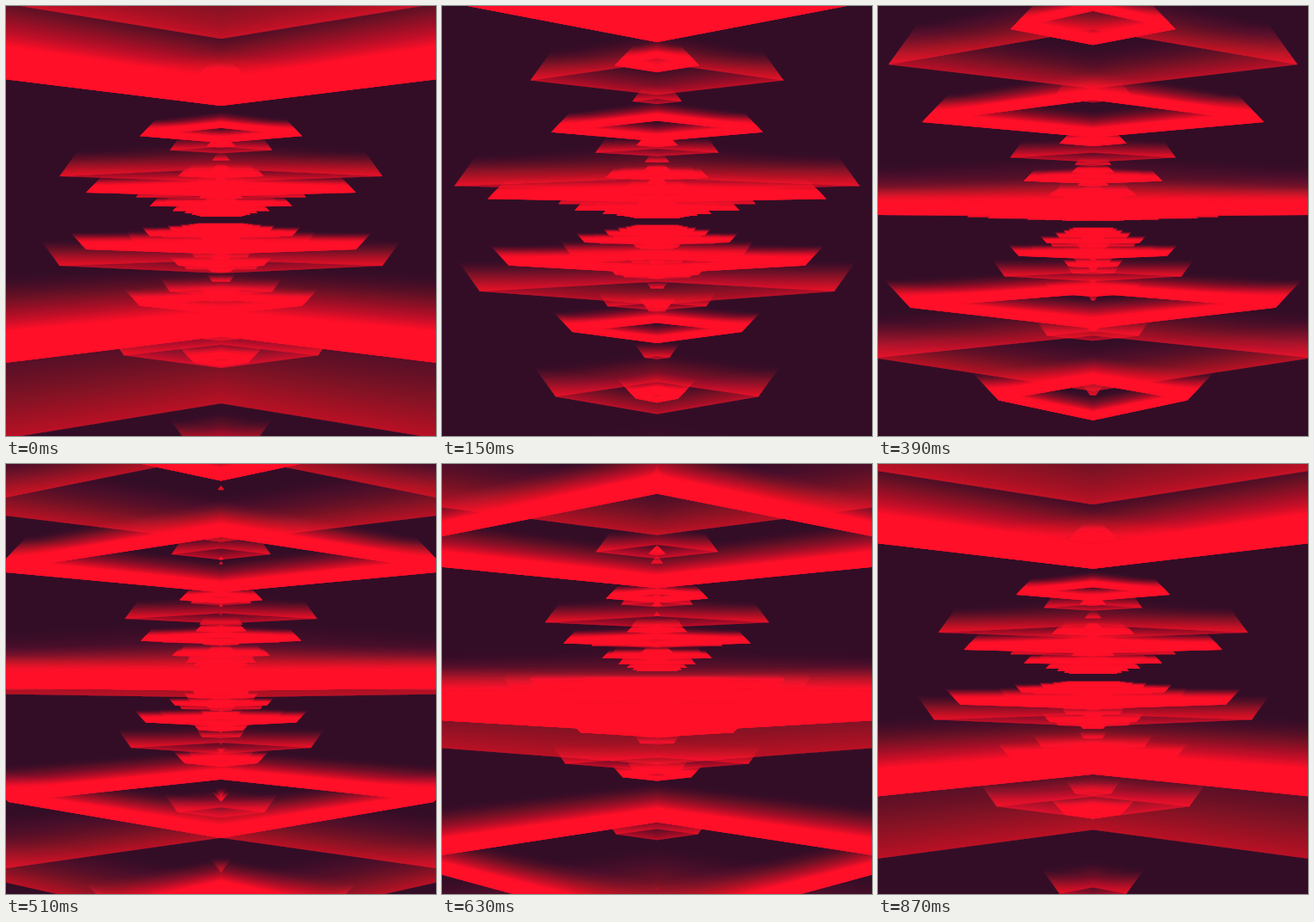
An HTML page with a canvas that plays this animation: 500 by 500 pixels, repeating every 900 ms.

```html
<!DOCTYPE html>
<html lang="en">
<head>
<meta charset="utf-8">
<title>Sliced octahedra</title>
<style>
  html, body { margin: 0; width: 100%; height: 100%; overflow: hidden; background: #ff0f28; }
  canvas { display: block; width: 500px; height: 500px; }
</style>
</head>
<body>
<canvas id="stage" width="500" height="500"></canvas>
<script>
// The page is red; walls are rubbed out of a dark sheet that lies on top of it.
const ctx = document.getElementById('stage').getContext('2d');
const SHEET = '#330d26';
const LOOP = 900, STEP = 30;
const MID = 250, FOCAL = 1200, NEAR = 3;
const GAP = 900, FIRST = 102, COUNT = 8, DEPTH = 173;
const EASE = 1.6; // curve of the fade from the top of a slice

// Two nested octahedra, each cut into slices that sink by one pitch per loop.
// ramp is the share of a slice over which it fades in.
const SOLIDS = [
  { width: 188, apex: 261, slice: 25, ramp: 1, alpha: 0.65 },
  { width: 157, apex: 165, slice: 16.5, ramp: 0.67, alpha: 1 }
];

const clamp = (v, lo, hi) => Math.min(hi, Math.max(lo, v));
const project = (x, y, z) => [x * FOCAL / z, MID + y * FOCAL / z];

// Side corner and middle corner of a wall at height y, cut at the near plane.
function edge(solid, y, z, dir) {
  const r = Math.max(0, 1 - Math.abs(y) / solid.apex);
  const x = solid.width * r, tip = z + dir * DEPTH * r;
  if (z < NEAR && tip < NEAR) return null;
  const cut = (NEAR - z) / (tip - z);
  const side = z < NEAR ? project(x * (1 - cut), y, NEAR) : project(x, y, z);
  const middle = tip < NEAR ? project(x * (1 - cut), y, NEAR) : project(0, y, tip);
  return { side, middle };
}

function fillWall(edges, alpha) {
  const outline = edges.map(e => e.side).concat(edges.map(e => e.middle).reverse());
  ctx.fillStyle = `rgba(0,0,0,${alpha})`;
  ctx.beginPath();
  for (const flip of [-1, 1]) {
    outline.forEach(([x, y], i) => ctx[i ? 'lineTo' : 'moveTo'](MID + flip * x, y));
    ctx.closePath();
  }
  ctx.fill('evenodd');
}

// Overlapping layers, each reaching down to the sharp lower edge, build the fade.
function drawWall(solid, bottom, z, dir) {
  const top = bottom - solid.slice;
  const low = Math.min(bottom, solid.apex);
  const last = edge(solid, low, z, dir);
  if (!last) return;
  const closest = Math.max(20, dir < 0 ? z - DEPTH : z);
  const layers = Math.round(clamp(solid.slice * FOCAL / closest / 1.5, 6, 40));
  let shown = 0;
  for (let i = 0; i < layers; i++) {
    const y = Math.max(top + solid.slice * solid.ramp * i / layers, -solid.apex);
    if (y >= low) break;
    const first = edge(solid, y, z, dir);
    if (!first) continue;
    const edges = [first];
    if (y < 0 && low > 0) {
      const waist = edge(solid, 0, z, dir);
      if (waist) edges.push(waist);
    }
    edges.push(last);
    const target = solid.alpha * ((i + 1) / layers) ** EASE;
    fillWall(edges, (target - shown) / (1 - shown));
    shown = target;
  }
}

function draw(t) {
  const phase = t / LOOP;
  ctx.globalCompositeOperation = 'source-over';
  ctx.fillStyle = SHEET;
  ctx.fillRect(0, 0, 500, 500);
  ctx.globalCompositeOperation = 'destination-out';
  for (let k = COUNT - 1; k >= 0; k--) {
    const z = FIRST + GAP * (k - phase);
    if (z + DEPTH < NEAR) continue;
    for (const solid of SOLIDS) {
      for (let n = -4; n < 4; n++) {
        const bottom = (n + 0.5 + phase) * solid.apex / 3;
        if (bottom <= -solid.apex || bottom - solid.slice >= solid.apex) continue;
        drawWall(solid, bottom, z, 1);
        drawWall(solid, bottom, z, -1);
      }
    }
  }
}

let drawn = -1;
function tick() {
  const step = Math.floor(performance.now() / STEP + 0.01) % (LOOP / STEP);
  if (step !== drawn) draw((drawn = step) * STEP);
  requestAnimationFrame(tick);
}
tick();
</script>
</body>
</html>
```
